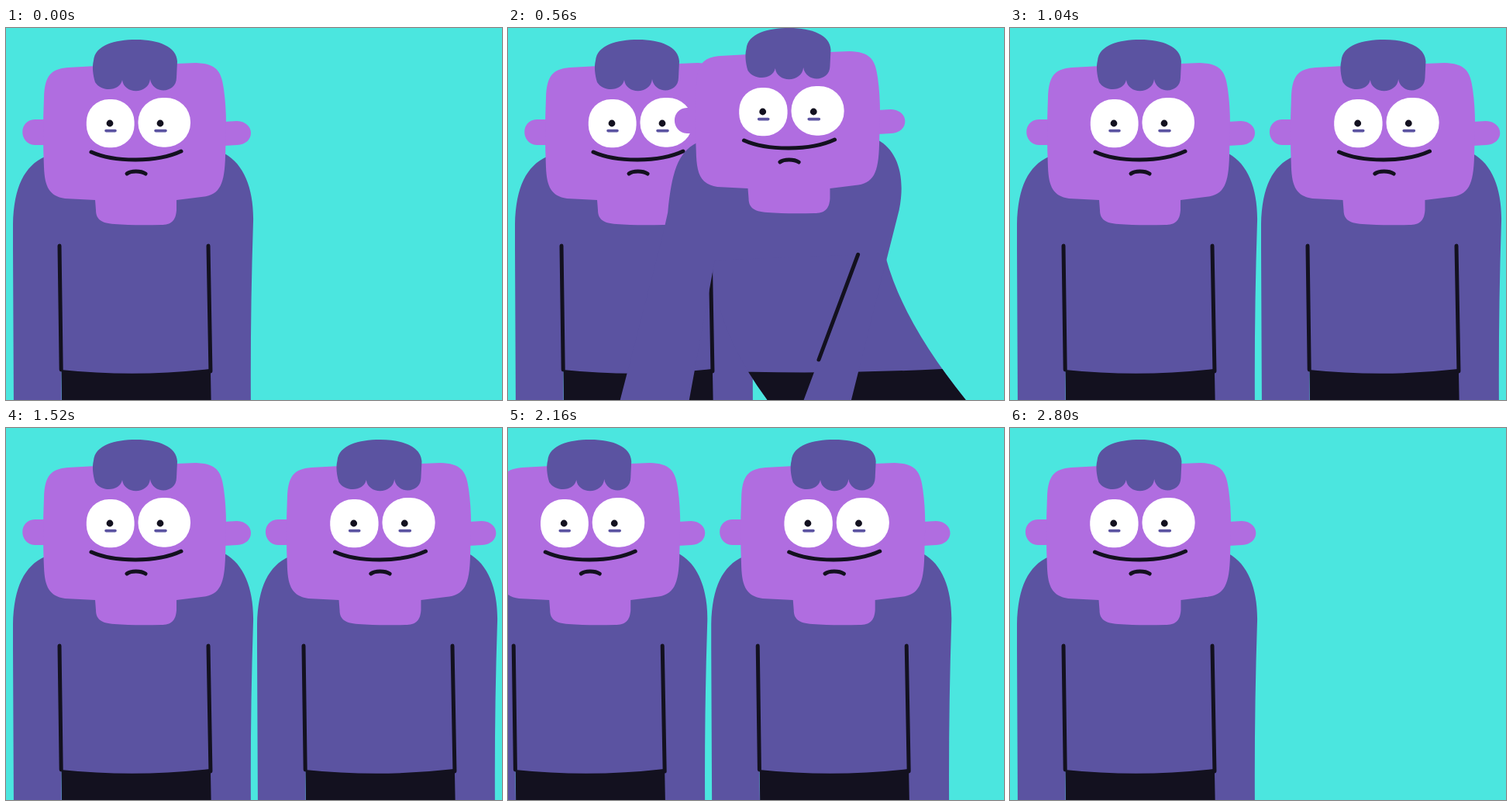
An HTML page that plays this animation: 640x480 px, repeating every 2880 ms.

```html
<!DOCTYPE html>
<html lang="en">
<head>
<meta charset="utf-8">
<title>Twins</title>
<style>
html, body { margin: 0; width: 100%; height: 100%; overflow: hidden; background: #4be6df; }
svg { display: block; width: 640px; height: 480px; }
.shirt { fill: #5b53a1; }
.skin { fill: #b06de0; }
.dark { fill: #13111f; }
.line { fill: none; stroke: #13111f; stroke-width: 5; stroke-linecap: round; }
.bag { fill: none; stroke: #5b53a1; stroke-width: 3.6; stroke-linecap: round; }
</style>
</head>
<body>
<svg viewBox="0 0 640 480">
  <defs>
    <g id="head">
      <path class="skin" d="M52 118H37C16 119 16 149 37 151H52ZM281 121L298 120C322 121 322 150 298 151L281 152Z"/>
      <path class="skin" d="M49 90C50 62 57 53 80 51L116 49L220 46L245 45C270 46 278 54 281 79Q284 100 284 125L283 165C282 202 276 216 252 218L220 222V235C219 249 213 254 200 254Q165 255 140 253C121 252 116 245 116 235L115 222L76 220C56 217 50 205 49 180Q47 135 49 90Z"/>
      <path class="shirt" d="M115 70C112 60 111 50 113 42C115 22 140 15 168 15C197 15 220 24 221 43L220 64C220 85 189 86 186 66C184 86 152 86 150 67C147 82 123 83 115 70Z"/>
      <g fill="#fff">
        <rect x="103.8" y="92" width="61.8" height="62.3" rx="29" ry="29"/>
        <rect x="170.5" y="90" width="67.5" height="63.7" rx="32" ry="31"/>
      </g>
      <circle class="dark" cx="134" cy="123" r="4.4"/>
      <circle class="dark" cx="199" cy="123" r="4.4"/>
      <path class="bag" d="M129 132.6H141M193 132.6H206"/>
      <path class="line" d="M110 160C140 173.5 195 173.5 226 159M156 188C161 184 174 184 180 188"/>
    </g>
  </defs>
  <g id="stage"></g>
</svg>
<script>
const LOOP = 2880, STEP = 80, GAP = 315;
const NS = "http://www.w3.org/2000/svg";
const stage = document.getElementById("stage");

function add(parent, tag, attrs) {
  const el = document.createElementNS(NS, tag);
  for (const key in attrs) el.setAttribute(key, attrs[key]);
  return parent.appendChild(el);
}

function makeFigure(id, headScale) {
  const root = add(stage, "g", {});
  const clip = add(add(root, "clipPath", { id }), "path", {});
  const torso = add(root, "path", { class: "shirt" });
  const belt = add(root, "path", { class: "dark", "clip-path": `url(#${id})` });
  const upper = add(root, "g", {});
  const arms = add(upper, "path", { class: "shirt" });
  const lines = add(upper, "path", { class: "line" });
  const mid = 168;
  add(upper, "use", {
    href: "#head",
    transform: `translate(${mid} 0) scale(${headScale} 1) translate(${-mid} 0)`
  });
  return { root, clip, torso, belt, upper, arms, lines };
}

// lean: hips pulled right; swing: arms trailing left; lift: upper body raised
function pose(fig, x, { lean = 0, swing = 0, lift = 0 } = {}) {
  const k = lean, s = swing;
  fig.root.setAttribute("transform", `translate(${x} 0)`);
  fig.upper.setAttribute("transform", `translate(0 ${-lift})`);

  const torso = `M${70 + 8 * k} 240V345Q${71 + 29 * k} ${405 + 7 * k} ${72 + 123 * k} 480` +
    `H${266 + 236 * k}Q${264 + 93 * k} ${379 + 2 * k} ${263 + 54 * k} 297L262 200Z`;
  fig.torso.setAttribute("d", torso);
  fig.clip.setAttribute("d", torso);

  const left = 71 + 89 * k, right = 263 + 184 * k;
  fig.belt.setAttribute("d",
    `M${left - 60} ${441 + 5 * k}H${left}Q${(left + right) / 2} ${451 - 9 * k} ${right} 440H${right + 90}V480H${left - 60}Z`);

  const inL = [69 + 5 * k, 281 + 31 * Math.max(s, 0)];
  const inR = [261 - 4 * k - 2 * s, 281 + 24 * s];
  const handL = 72 + 2 * k - 32 * s, handR = 265 - 2 * k - 72 * s;
  const outL = 10 + 2 * k - 57 * s, outR = 316 - 63 * s;
  const edgeR = 319 - k - 8 * s, rise = 5 * k;
  fig.arms.setAttribute("d",
    `M${50 - 3 * k} ${166 - rise}C24 ${178 - rise} ${10 + 3 * k + 4 * s} ${205 - rise} ${9 + 4 * k} 253` +
    `L${9 + 3 * k - 6 * s} 285L${outL} 500H${handL}L${inL}L${inR}L${handR} 500H${outR}` +
    `Q${315 - k - 32 * s} 370 ${edgeR} 250C${edgeR + 1 + 7 * s} ${210 - rise} 308 ${176 - rise} 282 ${162 - rise}L157 250Z`);

  let d = "";
  const to = (from, end, y) => {
    const f = (y - from[1]) / (500 - from[1]);
    d += `M${from}L${from[0] + (end - from[0]) * f} ${y}`;
  };
  if (k < 0.1 && s < 0.1) to(inL, handL, 441);
  if (s > -0.1) to(inR, handR, 443);
  if (k > 0.3 && s < 0.3) d += "M319 317L317 443";
  fig.lines.setAttribute("d", d);
}

// value lists hold one entry per step, counted from `start`
function track(t, start, values) {
  const i = Math.round((t - start) / STEP);
  return values[Math.max(0, Math.min(values.length - 1, i))];
}

function easeInOut(p) {
  p = Math.max(0, Math.min(1, p));
  return p < 0.5 ? 4 * p ** 3 : 1 - 4 * (1 - p) ** 3;
}

const still = makeFigure("stillHips", 1);
const mover = makeFigure("moverHips", 1.009);

function draw(now) {
  const t = Math.floor((now % LOOP) / STEP) * STEP;
  const slide = -GAP * easeInOut((t - 1921) / 653);
  const jump = track(t, 400, [0, 36, 195, 304, 316, 316, 315]);

  still.root.style.display = t < STEP || (t >= 480 && slide > -GAP) ? "" : "none";
  mover.root.style.display = t < STEP ? "none" : "";

  pose(still, slide);
  pose(mover, jump + slide, {
    lean: track(t, 0, [0, 0.04, 0.16, 0.4, 0.72, 1, 1.18, 0.55, 0.09, 0.01, 0]),
    swing: track(t, 400, [0, 0.35, 1.1, 1.4, 1, 0.3, -0.13, -0.09, 0]),
    lift: track(t, 400, [0, 5, 15, 4, 0])
  });
}

function tick(now) {
  draw(now);
  requestAnimationFrame(tick);
}
draw(0);
requestAnimationFrame(tick);
</script>
</body>
</html>
```
